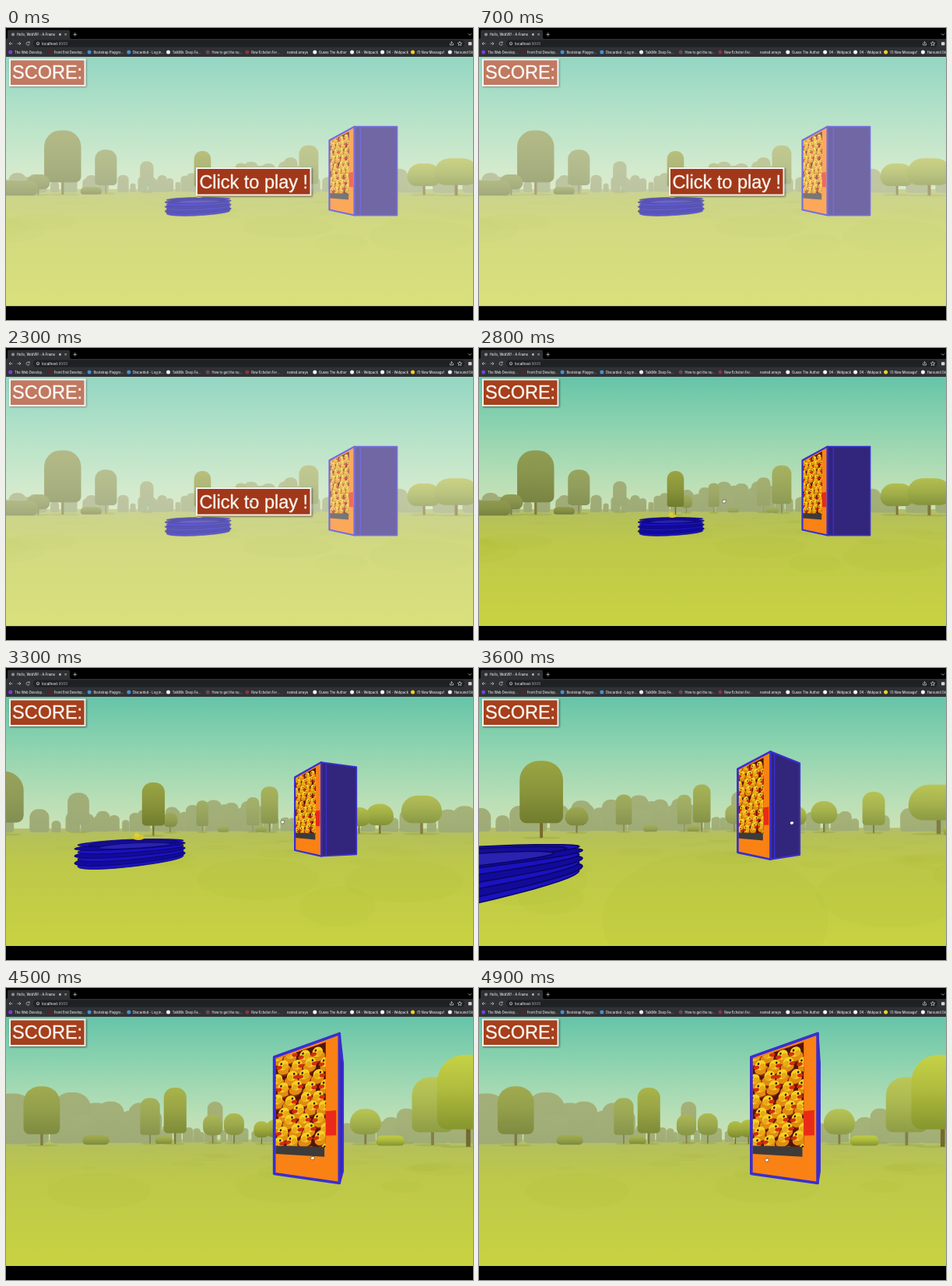
These frames come from a looping animation (600 by 375 pixels, 5 s). An HTML page with a canvas:

```html
<!DOCTYPE html>
<html lang="en">
<head>
<meta charset="utf-8">
<title>Hello, WebVR! - A-Frame</title>
<style>
  html, body { margin: 0; width: 100%; height: 100%; overflow: hidden; background: #000; }
  canvas, svg { position: absolute; left: 0; top: 0; width: 600px; height: 375px; display: block; }
  .ui { font: 500 4.15px Inter, Roboto, sans-serif; }
  .ui text { fill: #e2e3e6; }
  .big { font: 23.5px "Liberation Sans", Arial, sans-serif; fill: #f8f4ee; stroke: #f8f4ee; stroke-width: .35; }
  .line { fill: none; stroke: #cfd1d5; stroke-width: .7; }
  .solid { fill: #cfd1d5; }
  .shadow { filter: drop-shadow(1px 1.5px 1.2px rgba(0, 0, 0, .55)); }
</style>
</head>
<body>
<canvas id="scene" width="600" height="375"></canvas>
<svg viewBox="0 0 600 375">
  <g class="shadow">
    <rect x="5" y="40.5" width="96.5" height="33.5" fill="#a63f1c" stroke="#f4f3ee" stroke-width="2"/>
    <text class="big" x="8" y="65.3">SCORE:</text>
  </g>
  <g id="intro">
    <rect y="37" width="600" height="320.5" fill="#fff" opacity=".3"/>
    <g class="shadow">
      <rect x="245" y="180" width="146.5" height="34.5" fill="#a2381a" stroke="#f4f3ee" stroke-width="2"/>
      <text class="big" x="248.4" y="205.8">Click to play !</text>
    </g>
  </g>
  <path id="arrow" d="M0 0V5.6L1.4 4.4L2.3 6.3L3.2 5.9L2.3 4H4Z" fill="#111" stroke="#fff" stroke-width=".5"/>
  <path id="hand" d="M-2.3-.6Q-1.6-2.2 .2-2.1Q2.4-2.2 2.4-.3Q2.2 2-.4 2.2Q-1.4 2.2-2.3 .8Z" fill="#fff" stroke="#333" stroke-width=".6"/>
  <g class="ui">
    <rect width="600" height="14.5" fill="#000"/>
    <path d="M0 14.5V14Q2 14 2 12V4.5Q2 2.5 4 2.5H80Q82 2.5 82 4.5V12Q82 14 84 14V14.5Z" fill="#2f3033"/>
    <rect y="14" width="600" height="23" fill="#303134"/>
    <rect x="35" y="15.4" width="554" height="9.2" rx="4.6" fill="#1f2023"/>
    <circle cx="9" cy="8.3" r="2.1" fill="#8b8d91"/>
    <text x="14" y="9.8">Hello, WebVR! - A-Frame</text>
    <path class="solid" d="M68 7.4H69L70.4 6.3V10.3L69 9.2H68Z"/>
    <path class="line" d="M75.3 7L77.8 9.5M77.8 7L75.3 9.5M86.4 8.3H91M88.7 6V10.6M594 7.2L596 9.2L598 7.2"/>
    <path class="line" d="M8.5 20H4M6 18L4 20L6 22M14.5 20H19M17 18L19 20L17 22M29.8 18.6A2.1 2.1 0 1 0 30.3 20.6M30.2 17.4V19H28.6"/>
    <circle class="line" cx="41" cy="20" r="1.8"/>
    <path class="line" d="M41 19.8V21M570.5 19.5V22H574.5V19.5M572.5 21V17.6M571.3 18.7L572.5 17.5L573.7 18.7"/>
    <path class="line" d="M583 17.3L583.8 19.2L585.8 19.3L584.3 20.6L584.8 22.5L583 21.5L581.2 22.5L581.7 20.6L580.2 19.3L582.2 19.2Z"/>
    <rect class="solid" x="594" y="18" width="4.4" height="4.2" rx=".8"/>
    <text x="46" y="21.7" font-size="4.6">localhost<tspan fill="#8d9095">:8000</tspan></text>
    <g id="marks"></g>
  </g>
</svg>
<script>
const el = id => document.getElementById(id);
const ctx = el('scene').getContext('2d');
const lerp = (a, b, k) => a + (b - a) * k;
const mix = (a, b, k) => a.map((v, i) => lerp(v, b[i], k));
const clamp = (v, lo, hi) => Math.max(lo, Math.min(hi, v));
const rgb = c => `rgb(${c.map(Math.round)})`;
const RAD = Math.PI / 180, TAU = Math.PI * 2;
const LOOP = 5000, STEP = 100, START = 2500, RELEASE = 4100;
const FOCAL = 160 / Math.tan(40 * RAD), EYE = 1.6;

let seed = 77;
const rnd = () => (seed = (seed * 16807) % 2147483647) / 2147483647;

// Bookmarks: label and icon colour, laid out by label length
let markX = 11;
el('marks').innerHTML = [
  ['The Web Develop...', '#7d3be0'], ['Front End Develop...', '#5a2026'],
  ['Bootstrap Playgro...', '#3f93d8'], ['Discarded - Log in...', '#3f93d8'],
  ['TalkMir. Deep Fa...', '#eee'], ['How to get the nu...', '#6a4a4c'],
  ['Row Echelon For...', '#8a3440'], ['nested arrays'], ['Guess The Author', '#f2f2f2'],
  ['04 - Webpack', '#f2f2f2'], ['04 - Webpack', '#f2f2f2'],
  ['(1) New Message!', '#f2cf26'], ['Harounid Oda', '#f2f2f2']
].map(([label, c]) => {
  if (!c) markX -= 5;
  const x = markX;
  markX += c && label.endsWith('...') ? 50.7 : label.length * 2.2 + 12.6;
  return `<text x="${x}" y="32.6">${label}</text>` +
    (c ? `<circle cx="${x - 5.3}" cy="31" r="2.5" fill="${c}"/>` : '');
}).join('');

// Keyed tracks: each key is time, then two values
const walk = [[2850, 0, 0], [3600, .74, 4.26], [4100, .88, 8.54], [4900, .44, 9.17]];
const pointer = [
  [1000, 300, 60], [1400, 297, 163], [2000, 315, 197], [2850, 315, 197],
  [3600, 402, 199], [RELEASE, 466, 211], [4900, 370, 221]
];
const easeIn = k => k ** 1.5, easeOut = k => 1 - (1 - k) ** 2;
function track(keys, t) {
  const i = keys.findIndex(q => t <= q[0]);
  if (i < 1) return keys[i < 0 ? keys.length - 1 : 0].slice(1);
  const [a, b] = [keys[i - 1], keys[i]];
  const k = (t - a[0]) / (b[0] - a[0]);
  const ease = a[0] === 2850 ? easeIn : a[0] === RELEASE ? easeOut : v => v;
  return mix(a, b, ease(k)).slice(1);
}

// Dragging turns the view; walking moves it
let cam;
function aim(t) {
  const [x, z] = track(walk, t), [px, py] = track(pointer, clamp(t, 2850, RELEASE));
  const yaw = (px - 315) * .351 * RAD;
  cam = { x, z, sin: Math.sin(yaw), cos: Math.cos(yaw), hz: 208 - (py - 197) * .88 };
}
function view(x, z) {
  const dx = x - cam.x, dz = z - cam.z;
  const side = dx * cam.cos - dz * cam.sin, raw = dx * cam.sin + dz * cam.cos;
  const depth = Math.max(.3, raw);
  return { x: 300 + FOCAL * side / depth, raw, scale: FOCAL / depth, cos: depth / Math.hypot(side, depth), far: Math.hypot(dx, dz) };
}
function spot(x, z, up) {
  const v = view(x, z);
  return [v.x, cam.hz - (up - EYE) * v.scale];
}
const polar = (deg, r) => ({ x: r * Math.sin(deg * RAD), z: r * Math.cos(deg * RAD), deg });

// Plants by kind: bearing, distance, height
const SHAPES = {
  tall: { wide: .37, stem: .19, top: .44, foot: .16 },
  round: { wide: .67, stem: .28, top: .46, foot: .36 },
  bush: { wide: 2, stem: 0, top: .4, foot: .25 }
};
const grove = {
  tall: [
    [-50, 45, 12.5], [-42, 50, 11], [-32, 68, 12], [-14, 26, 7.5], [.5, 53, 10.5], [19, 56, 12.5],
    [25, 50, 14.5], [38.6, 66, 16], [73, 47, 8.5], [94, 70, 11], [94, 44.5, 12.7], [96.5, 37, 13]
  ],
  round: [
    [-53.6, 45, 3.7], [-10, 48, 5.6], [36.6, 53, 8.7], [43.4, 51, 9], [51.2, 43, 5.7],
    [55.6, 43, 6.1], [63, 47, 7.5], [82, 46, 8.2]
  ],
  bush: [[-57, 44, 2.4], [-45, 42, 1.5], [8, 52, 2], [22, 50, 1.9], [84, 36, 1.7]]
};
const plants = Object.entries(grove).flatMap(([kind, list]) =>
  list.map(([deg, r, tall]) => ({ ...SHAPES[kind], ...polar(deg, r), tall })));
const bump = (v, c, s) => Math.exp(-(((v - c) / s) ** 2));
for (let deg = -66; deg < 125; deg += 2.1) {
  const grow = 10 * bump(deg, 6, 19) + 5 * bump(deg, 93, 12);
  plants.push({
    ...SHAPES.tall, wide: .5, stem: 0,
    ...polar(deg + rnd() * 2, 72 + rnd() * 16), tall: 3.5 + rnd() * 5 + grow * (.4 + rnd() * .6)
  });
}
const blots = Array.from({ length: 60 }, () => ({ ...polar(-70 + rnd() * 200, 4 + rnd() * 30), size: .5 + rnd() * 1.6 }));

function gradient(y0, y1, ...stops) {
  const g = ctx.createLinearGradient(0, y0, 0, y1);
  stops.forEach(([k, c]) => g.addColorStop(k, c));
  return g;
}
function poly(points, fill) {
  ctx.beginPath();
  points.forEach(q => ctx.lineTo(...q));
  ctx.closePath();
  if (fill) { ctx.fillStyle = fill; ctx.fill(); }
}
function oval(x, y, rx, ry, fill) {
  ctx.fillStyle = fill;
  ctx.beginPath();
  ctx.ellipse(x, y, rx, ry, 0, 0, TAU);
  ctx.fill();
}

function drawLand() {
  const { hz } = cam;
  ctx.fillStyle = gradient(37, hz, [0, '#66c4a8'], [.4, '#90d4b0'], [.8, '#bbdfb6'], [1, '#cce2b6']);
  ctx.fillRect(0, 37, 600, 180);
  ctx.fillStyle = gradient(hz - 2, 357, [0, '#b3bd6e'], [.08, '#b5c158'], [.3, '#bdc84a'], [1, '#c9d241']);
  ctx.fillRect(0, hz - 1, 600, 358 - hz);
  for (const b of blots) {
    const v = view(b.x, b.z);
    if (v.raw > 2) oval(v.x, cam.hz + EYE * v.scale, b.size * v.scale, b.size * EYE * v.scale ** 2 / FOCAL, 'rgba(130,150,30,.05)');
  }
}

const HAZE = [163, 176, 126];
function drawPlant({ deg, tall, wide, stem, top, foot, v }) {
  if (v.raw < 3) return;
  const s = v.scale, base = cam.hz + .9 * s, y = base - tall * s, bottom = base - tall * stem * s;
  const w = tall * wide * s / v.cos, h = bottom - y;
  const haze = clamp((v.far - 38) / 24, .03, .9), sun = clamp((deg + 50) / 150, 0, 1);
  const light = mix(mix([138, 148, 64], [201, 213, 68], sun), HAZE, haze);
  const dark = mix(mix([104, 114, 44], [134, 150, 44], sun), HAZE, haze);
  if (stem) {
    const tw = Math.max(1, w * .07);
    oval(v.x, base, w * .45, 1.5, 'rgba(115,130,35,.2)');
    ctx.fillStyle = rgb(mix([116, 104, 40], HAZE, haze));
    ctx.fillRect(v.x - tw / 2, bottom - 2, tw, base - bottom + 2);
  }
  const a = Math.min(w * top, h * .58), b = Math.min(w * foot, h * .4);
  ctx.beginPath();
  ctx.roundRect(v.x - w / 2, y, w, h, [a, a, b, b]);
  ctx.fillStyle = gradient(y, bottom, [0, rgb(light)], [.45, rgb(mix(light, dark, .35))], [1, rgb(dark)]);
  ctx.fill();
}

const POOL = { x: -3.1, z: 11.4, r: 2.3, rim: .92 };
function drawPool() {
  const c = view(POOL.x, POOL.z);
  if (c.raw < -1.2) return;
  const ring = (up, size, fill) => {
    const pts = Array.from({ length: 48 }, (_, i) => {
      const a = i / 48 * TAU, r = POOL.r * size * (1 + .05 * Math.cos(3 * a));
      return spot(POOL.x + r * Math.cos(a), POOL.z + r * Math.sin(a), up);
    });
    poly(pts, fill);
    ctx.strokeStyle = '#0a0666';
    ctx.lineWidth = clamp(c.scale * .035, .5, 2);
    ctx.stroke();
  };
  for (let i = 0; i <= 6; i++) ring(POOL.rim * i / 6, i % 2 ? 1.02 : .98, i % 2 ? '#120b9a' : '#1a12c0');
  ring(POOL.rim - .05, .84, '#140d94');
  ring(POOL.rim - .2, .7, '#2a22b0');
  if (c.raw > 1) {
    const y = cam.hz + .45 * c.scale, s = c.scale * .34;
    oval(c.x, y, s, s * .45, '#d8c42c');
    oval(c.x - s * .25, y - s * .4, s * .4, s * .36, '#e0cf34');
  }
}

const ducks = Array.from({ length: 40 }, (_, i) => ({
  u: .02 + (i % 4) * .215 + (Math.floor(i / 4) % 2) * .09 + rnd() * .05,
  v: .03 + Math.floor(i / 4) * .083 + rnd() * .035,
  side: rnd() < .5 ? -1 : 1
}));
function drawDuck({ u, v, side }) {
  const part = (x, y, rx, ry, c) => oval(u + x * side, v + y, rx, ry, c);
  part(.035, .045, .1, .042, '#8a2408');
  part(.015, .036, .1, .038, '#e08c10');
  part(0, 0, .08, .038, '#f6d024');
  part(.03, .012, .04, .022, '#e9a818');
  part(-.06, .014, .045, .014, '#d42c10');
  part(-.03, -.012, .015, .009, '#2b1a10');
}

const BOX = { x: 7.25, z: 9.37, front: 2.6, side: 2.7, tall: 5.6 };
function drawCabinet() {
  const { x, z, front, side, tall } = BOX;
  const [ft, fb] = [tall, 0].map(up => spot(x, z + front, up));
  const [nt, nb] = [tall, 0].map(up => spot(x, z, up));
  const [st, sb] = [tall, 0].map(up => spot(x + side, z, up));
  const at = (u, v) => mix(mix(ft, nt, u), mix(fb, nb, u), v);
  const patch = (u0, v0, u1, v1, c) => poly([at(u0, v0), at(u1, v0), at(u1, v1), at(u0, v1)], c);
  const edge = Math.max(2, (nb[1] - nt[1]) * .019);
  ctx.lineJoin = 'round';
  ctx.strokeStyle = '#3a2ed0';

  if (st[0] > nt[0]) {
    poly([nt, st, sb, nb], '#32257c');
    ctx.lineWidth = edge * .8;
    ctx.stroke();
    ctx.beginPath();
    ctx.moveTo(...mix(nt, st, .14));
    ctx.lineTo(...mix(nb, sb, .14));
    ctx.lineWidth = edge * .6;
    ctx.stroke();
  }
  patch(0, 0, 1, 1, '#fa8214');
  ctx.save();
  patch(.02, .025, .79, .77, '#541408');
  ctx.clip();
  const o = at(.4, .4), ux = at(.9, .4), vy = at(.4, .9);
  const [a, b, c, d] = [ux[0] - o[0], ux[1] - o[1], vy[0] - o[0], vy[1] - o[1]].map(n => n * 2);
  ctx.transform(a, b, c, d, o[0] - .4 * (a + c), o[1] - .4 * (b + d));
  ducks.forEach(drawDuck);
  ctx.restore();
  patch(.02, .76, .77, .83, '#3d3a3a');
  patch(.79, .51, .95, .68, '#ea2a18');
  patch(0, 0, 1, 1);
  ctx.lineWidth = edge;
  ctx.stroke();
}

function drawPointer(t) {
  const [x, y] = track(pointer, t);
  for (const id of ['arrow', 'hand']) {
    const on = t >= pointer[0][0] && (t >= 1800) === (id === 'hand');
    el(id).setAttribute('visibility', on ? 'visible' : 'hidden');
    el(id).setAttribute('transform', `translate(${x} ${y})`);
  }
}

function draw(t) {
  aim(t);
  ctx.fillStyle = '#000';
  ctx.fillRect(0, 0, 600, 375);
  ctx.save();
  ctx.beginPath();
  ctx.rect(0, 37, 600, 320);
  ctx.clip();
  drawLand();
  plants.map(p => ({ ...p, v: view(p.x, p.z) })).sort((p, q) => q.v.far - p.v.far).forEach(drawPlant);
  drawPool();
  drawCabinet();
  ctx.restore();
  el('intro').setAttribute('visibility', t < START ? 'visible' : 'hidden');
  drawPointer(t);
}

const begin = performance.now();
function tick() {
  const t = (performance.now() - begin) % LOOP;
  draw(Math.floor(t / STEP) * STEP);
  requestAnimationFrame(tick);
}
tick();
</script>
</body>
</html>
```
